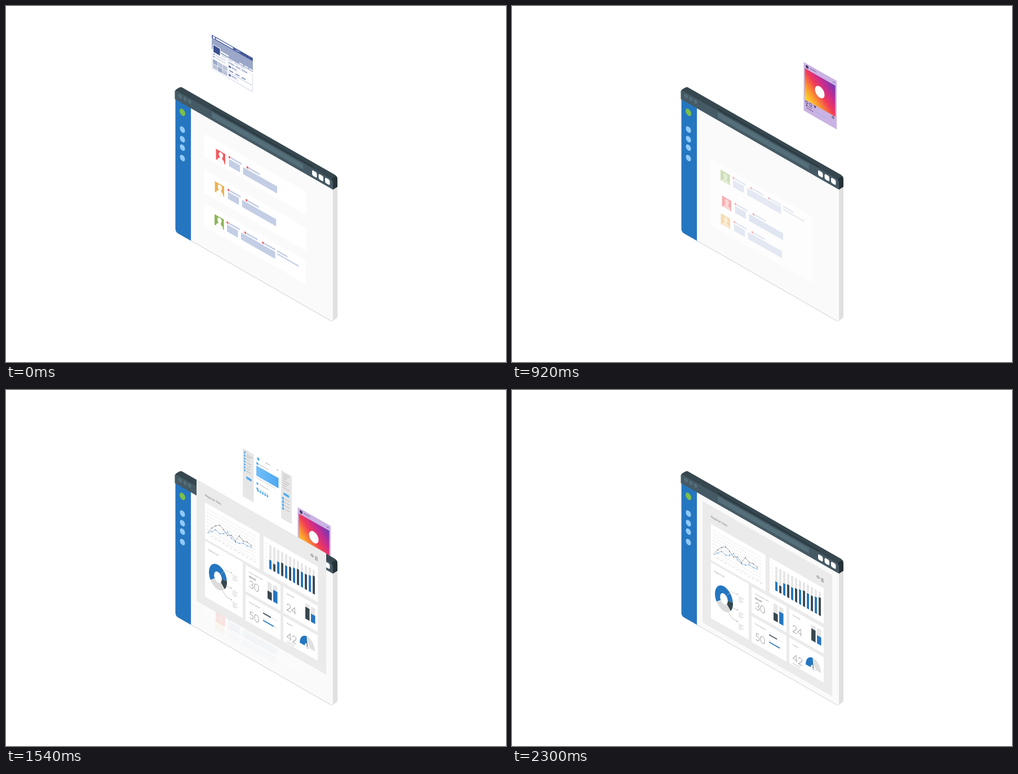
Animation of 887 by 631 pixels, one loop 2.32 s. Source, as an HTML page with a canvas:

```html
<!DOCTYPE html>
<html lang="en">
<head>
<meta charset="utf-8">
<style>
  html, body { margin: 0; width: 100%; height: 100%; overflow: hidden; background: #fff; }
  canvas { display: block; }
</style>
</head>
<body>
<canvas id="stage" width="887" height="631"></canvas>
<script>
const ctx = document.getElementById('stage').getContext('2d');
const LOOP = 2320, SLOPE = 0.569;
const BLUE = '#2576c0', DARK = '#455a64', GREY = '#e0e0e0', RED = '#ee5d60', LILAC = '#c3cee5';

// Everything on a plane is drawn in local units, sheared into the isometric view.
function plane(x, y, alpha, draw) {
  if (alpha <= 0) return;
  ctx.save();
  ctx.globalAlpha = Math.min(1, alpha);
  ctx.transform(1, SLOPE, 0, 1, x, y);
  draw();
  ctx.restore();
}
function rect(color, x, y, w, h, r = 0) {
  ctx.fillStyle = color;
  ctx.beginPath();
  ctx.roundRect(x, y, w, h, r);
  ctx.fill();
}
function oval(color, x, y, rx, ry = rx) {
  ctx.fillStyle = color;
  ctx.beginPath();
  ctx.ellipse(x, y, rx, ry, 0, 0, 7);
  ctx.fill();
}
function shape(color, path) {
  ctx.fillStyle = color;
  ctx.fill(new Path2D(path));
}
function line(color, width, ...points) {
  ctx.strokeStyle = color;
  ctx.lineWidth = width;
  ctx.beginPath();
  points.forEach(([x, y]) => ctx.lineTo(x, y));
  ctx.stroke();
}
// Ring sector; angles in degrees, clockwise from the top.
function sector(color, x, y, rx, ry, hole, from, to) {
  const a = (from - 90) * Math.PI / 180, b = (to - 90) * Math.PI / 180;
  ctx.fillStyle = color;
  ctx.beginPath();
  ctx.ellipse(x, y, rx, ry, 0, a, b);
  ctx.ellipse(x, y, rx * hole, ry * hole, 0, b, a, true);
  ctx.fill();
}
function text(str, x, y, size, color = '#888', weight = 400) {
  ctx.save();
  ctx.translate(x, y);
  ctx.scale(0.866, 1);
  ctx.fillStyle = color;
  ctx.font = `${weight} ${size}px Lato, sans-serif`;
  ctx.fillText(str, 0, 0);
  ctx.restore();
}
function figure(str, x, y) {
  text(str, x, y, 18, '#858585', 300);
}

function drawWindow() {
  shape(GREY, 'M570 310L588 318V549Q588 553 584 555L580 558Q577 560 573 557L305 403.500L320 350Z');
  shape('#fafafa', 'M328 181L580 325V555Q580 560 575 556.500L328 415Z');
  shape(BLUE, 'M300.500 164L328 179V416L305 403Q300.500 400 300.500 395Z');
  shape('#37474f', 'M299.500 153Q299.500 149 303 147L308 144.300Q310.500 143 313 144.700L582 298.300Q588 301.500 588 307L580 313Z');
  shape('#263238', 'M577 307L586 301.500Q588 304 588 308V320.500L580 325.500Z');
  shape(DARK, 'M299.500 153Q299.500 148 304 151L575 305.500Q580 308 580 313V325.500L299.500 165Z');
  line('#2b3b43', 2.5, [365, 182.5], [545, 285.5]);
  plane(300, 150, 1, () => {
    rect('#546e7a', 65, 1, 162, 9.5);
    for (const x of [9, 17.5, 25.5]) oval('#546e7a', x, 5, 3, 3.8);
    for (const x of [243, 254.5, 266]) rect('#fff', x, 2.2, 8.5, 9.5, 2.5);
  });
  plane(313, 188.5, 1, () => oval('#7cc04b', 0, 0, 5, 6));
  for (const y of [219, 236, 251, 269.5])
    plane(313, y, 1, () => oval('#90caf9', 0, 0, 4.5, 5.2));
}

// One contact row; its place is the top left corner of the portrait.
function row(color, x, y, alpha, { shift = 0, cardX = -19, cardY = -9.5, extra = false }) {
  plane(x, y, alpha, () => {
    rect('#fff', cardX, cardY, 181, 41);
    rect(color, 0, 0, 16.5, 18.5);
    oval('#fff', 8.8, 6, 3.7, 4.5);
    shape('#fff', 'M2.500 18.500Q2.500 14 6.500 12.500V9H11V12.500Q15 14 15 18.500Z');
    ctx.translate(shift, shift ? 0.5 : 0);
    const heads = extra ? [24, 55.5, 87] : [24, 56];
    for (const hx of heads) {
      rect(RED, hx - 1.7, -0.5, 3.4, 3.6, 1);
      rect(LILAC, hx + 2.5, -0.3, 19, 3);
    }
    rect(LILAC, 23, 5, 19.5, 12.5);
    rect(LILAC, 48, 5, 60.5, 12.5);
    if (extra) {
      rect(LILAC, 112, 0, 18.5, 2.8);
      rect(LILAC, 112, 5.3, 38, 2.6);
    }
  });
}

function profileCard() {
  rect('#e4e8f2', 0, 0, 73, 61);
  rect('#9ba7c8', 0, 6, 73, 19);
  rect('#5064a4', 0, 0, 73, 6);
  rect('#fff', 2, 1.3, 3.6, 3.6);
  rect('#fff', 7.5, 1.5, 30, 2.8);
  rect('#c5cde2', 43, 2.3, 6, 1.4);
  for (const x of [52, 57, 62, 68]) rect('#34477f', x, 1.7, 2.8, 2.8);
  rect('#fff', 0, 25, 73, 4);
  rect('#fff', 2, 16, 13.5, 14);
  rect('#3b4f8c', 3, 17, 11.5, 12);
  rect('#fff', 16, 20, 14, 2.5);
  for (const x of [49, 58, 66]) rect('#fff', x, 21.5, 6.5, 2);
  for (const x of [18, 29, 40, 51]) rect('#b6bfd8', x, 26.3, 8, 1.3);
  rect('#fff', 1.5, 30, 26.5, 30);
  for (const y of [32.5, 37]) {
    oval('#7187bd', 4, y, 1.3);
    rect('#bcc5dc', 6.5, y - 0.7, 18, 1.3);
  }
  for (let i = 0; i < 6; i++)
    rect(i % 4 ? '#bcc4d8' : '#9fabc9', 2 + i % 3 * 8.7, 42 + (i / 3 | 0) * 8.5, 8, 7.7);
  rect('#fff', 29.5, 30, 42, 29);
  for (const [x, w] of [[30, 10], [42, 9], [53, 10]]) rect('#aab5d2', x, 31, w, 2.5);
  for (const y of [39, 54]) {
    oval('#5064a4', 32, y, 2);
    rect('#7f8fbd', 35, y - 1.5, 9, 1.4);
    rect('#cfd6e6', 35, y + 0.7, 13, 1);
  }
  for (const x of [31, 42, 53]) rect('#5a6ca8', x, 45, 7, 1.4);
  rect('#d0d6e7', 30, 48.5, 41, 1.6);
}

function photoCard() {
  rect('#cab3e3', 0, 0, 58.5, 86);
  const g = ctx.createLinearGradient(2, 65, 56, 10);
  [[0, '#fee034'], [0.25, '#fb9a2f'], [0.5, '#f23b57'], [0.72, '#c92c8f'], [1, '#6a3bb5']]
    .forEach(([at, c]) => g.addColorStop(at, c));
  rect(g, 2, 10, 54, 55);
  oval('#fff', 28.5, 37, 8.5, 10);
  const ink = '#4b3d63';
  oval(ink, 6, 5.2, 2.6, 2.8);
  rect('#8b78a8', 11, 4, 11, 1.6);
  rect(ink, 52, 5, 3, 0.8);
  ctx.strokeStyle = ink;
  ctx.lineWidth = 0.9;
  for (const x of [5.5, 12.5]) {
    ctx.beginPath();
    ctx.ellipse(x, 68.5, 2, 2.3, 0, 0, 7);
    ctx.stroke();
  }
  shape(ink, 'M17.500 66L22.500 66.500L19.500 71L19 68.500Z');
  ctx.strokeRect(50.5, 67, 2.8, 3);
  oval(ink, 5.3, 74, 1.4);
  rect('#7f6b9c', 8, 73.2, 7, 1.4);
  rect('#7f6b9c', 5, 77.5, 12, 1.4);
  rect('#a9b4ea', 20, 75.5, 22, 1.2);
}

function feedCard() {
  const sky = '#55acee', soft = '#bdbdbd';
  rect('#fff', 0, 0, 87, 85);
  rect('#e6e6e6', 0, 0, 19.5, 85);
  rect('#e6e6e6', 68, 0, 19, 85);
  rect(soft, 2, 2.5, 6, 1.2);
  rect(soft, 7, 7, 11, 1.2);
  for (let i = 0; i < 7; i++) {
    oval(sky, 3.5, 6 + i * 5.2, 1.5, 1.8);
    if (i) rect(soft, 6.5, 5.2 + i * 5.2, 8 - i % 3, 1.2);
  }
  rect(sky, 6, 46, 10, 4.5, 2);
  oval(sky, 27.5, 3.5, 2.2, 2.6);
  rect(soft, 40, 2, 9, 1.2);
  rect(soft, 60, 3, 3, 1.5);
  oval(sky, 26, 12.5, 2, 2.3);
  rect(soft, 29, 11.5, 17, 1.2);
  const g = ctx.createLinearGradient(24, 0, 63, 0);
  g.addColorStop(0, '#74bff8');
  g.addColorStop(1, '#4da8f0');
  rect(g, 24, 17, 39.5, 18);
  rect(soft, 24, 38, 34, 0.7);
  for (const y of [48, 57]) {
    oval(sky, 26, y, 1.8, 2.1);
    rect(soft, 30, y - 1, 16, 1.1);
  }
  for (let x = 27; x < 48; x += 4.2) oval(sky, x, 60, 1.6, 2);
  for (let i = 0; i < 7; i++) rect(soft, 71, 4 + i * 4, 12 - i % 3 * 3, 1.2);
  rect(sky, 72, 37, 10.5, 4.5, 2);
  for (let i = 0; i < 4; i++) {
    oval(sky, 71.5, 48 + i * 6, 1.9, 2.3);
    rect(soft, 75, 47 + i * 6, 8, 1.2);
  }
}

function lineChart() {
  for (let i = 0; i < 8; i++) {
    line('#e4e4e4', 0.6, [20, 41 + i * 6], [105, 41 + i * 6]);
    rect('#ccc', 18.5, 40.5 + i * 6, 1.5, 0.9);
  }
  for (let x = 25; x < 104; x += 7) rect('#ccc', x, 86, 3.5, 0.9);
  const series = [
    ['#7d8388', [83, 70.6, 62.7, 57.7, 61.7, 67.7, 63.7, 69.7, 56.8, 61.8, 59.8, 61.8]],
    ['#6ea6dc', [83.6, 76.6, 69.7, 72.7, 68.7, 61.7, 68.7, 71.7, 69.8, 65.8, 66.8, 64.8]]
  ];
  for (const [color, ys] of series) {
    const points = ys.map((y, i) => [20 + i * 7, y]);
    line(color, 0.6, ...points);
    points.slice(1).forEach(([x, y]) => oval(color, x, y, 1));
  }
}

function barChart() {
  for (let i = 0; i < 8; i++) rect('#ccc', 123, 42 + i * 6, 1.5, 0.9);
  [16, 13, 21, 23, 22, 24, 26, 28, 27, 27, 29, 32].forEach((h, i) => {
    const x = 129 + i * 7;
    rect('#e6e6e6', x, 42, 4, 42.5);
    rect(i % 2 ? '#3e4d57' : BLUE, x, 84.5 - h, 4, h);
  });
}

function miniBars(x, base, top, dark, blue) {
  [['#37474f', dark], [BLUE, blue]].forEach(([color, h], i) => {
    rect('#e6e6e6', x + i * 10, top, 7.5, base - top);
    rect(color, x + i * 10, base - h, 7.5, h);
  });
}

function dashboard() {
  rect('#ebebeb', 0, 0, 230, 215);
  text('Regional Sales', 15, 20.5, 5.4, '#777');
  ctx.strokeStyle = '#777';
  ctx.lineWidth = 1;
  ctx.beginPath();
  ctx.arc(205, 18, 1.9, 0, 7);
  ctx.stroke();
  for (const y of [16.5, 19, 21.5]) rect('#777', 210, y - 0.5, 5, 1);

  for (const [x, y, w, h] of [[15, 32, 97, 64], [119, 32, 96, 63], [15, 100, 67, 99],
    [87, 102, 62, 46], [154, 102, 61, 46], [87, 154, 62, 46], [154, 154, 61, 45]])
    rect('#fff', x, y, w, h);

  lineChart();
  barChart();

  text('Regional Sale', 21, 113.5, 3.6);
  sector(BLUE, 38, 151.5, 16, 22, 0.43, -124, 85);
  sector('#37474f', 38, 151.5, 16, 22, 0.43, 85, 132);
  sector('#dcdcdc', 38, 151.5, 16, 22, 0.43, 132, 236);
  line('#ccc', 0.7, [44, 142], [50, 132], [62, 130]);
  line('#aaa', 0.6, [52, 157], [55, 159], [62, 157.5]);
  line('#aaa', 0.6, [46, 171], [53, 178], [62, 178]);
  for (const y of [130, 157.5, 178]) {
    oval('#888', 62, y, 0.8);
    for (let i = 0; i < 4; i++) rect('#ccc', 64, y + 2 + i * 2.7, 9 - i % 2 * 3, 1);
  }

  text('Conservation Sales', 93, 112, 3.4);
  text('000.000', 93, 120, 3.8, '#555', 700);
  figure('30', 93, 137.5);
  miniBars(126, 139, 109, 14, 21);

  text('Total Sales', 160, 112, 3.4);
  figure('24', 159, 140.5);
  miniBars(193, 136.5, 109, 21, 14.5);

  text('Group Support', 93, 165, 3.4);
  figure('50', 93, 192);
  [['#37474f', 14, 169], [BLUE, 19, 182]].forEach(([color, w, y]) => {
    rect('#ccc', 118, y - 3.5, 4, 0.9);
    rect('#ddd', 118, y, 25, 0.9);
    rect(color, 118, y - 0.5, w, 1.9);
  });

  text('Support', 160, 164, 3.4);
  figure('42', 160, 191.5);
  text('Conversion', 160, 197, 3.2);
  sector('#e0e0e0', 196.5, 185, 13.5, 18.5, 0.34, 0, 90);
  sector(BLUE, 196.5, 185, 13.5, 18.5, 0.34, -90, -4);
  oval('#e0e0e0', 196.5, 185, 2.8, 3.6);
  line('#455a64', 1, [196.5, 184], [195.5, 176]);
}

function draw(t) {
  ctx.fillStyle = '#fff';
  ctx.fillRect(0, 0, 887, 631);

  plane(365, 50.5 + 0.15 * t, 1 - t / 930, profileCard);
  if (t >= 1540) plane(420, 103 + 0.206 * (t - 1540), 1, feedCard);
  if (t >= 920) plane(517.5, 99.2 + 0.1748 * (t - 920), 1, photoCard);

  drawWindow();

  const green = '#8db659', amber = '#eeb152', wide = { shift: -1, extra: true };
  if (t >= 200) row(green, 370, 246 + 0.161 * Math.max(0, t - 647), 1 - t / 1600, wide);
  if (t >= 1000 && t < 1760) row(amber, 370.5, 246 + 0.16 * (t - 1005), 1 - (t - 1000) / 1850, { shift: 0.2 });
  row(green, 370, 369 + 0.05 * t, 1 - t / 860, wide);
  row(RED, 372.5, 253 + 0.0902 * t, 1 - t / 1800, { cardX: -21, cardY: -15 });
  row(amber, 370.5, 310.5 + 0.0619 * t, 1 - t / 1650, { shift: 0.2 });

  if (t >= 1540) plane(338, 197 - 0.0505 * (2300 - t), 1, dashboard);
}

function tick() {
  draw(performance.now() % LOOP);
  requestAnimationFrame(tick);
}
tick();
</script>
</body>
</html>
```
